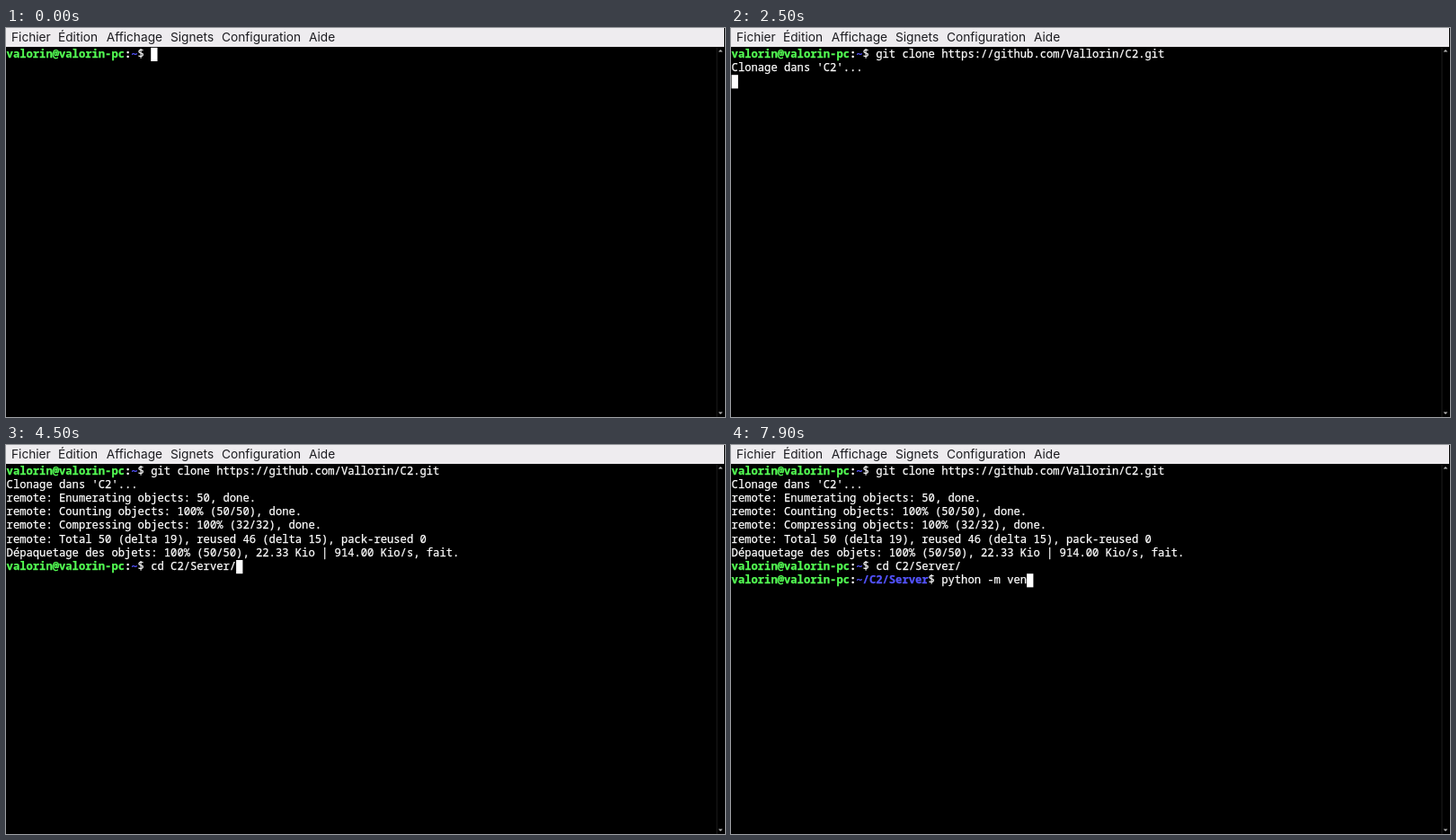
An HTML page with a canvas that plays this animation: 800 by 433 pixels, repeating every 8 s.

```html
<!DOCTYPE html>
<html lang="fr">
<head>
<meta charset="utf-8">
<title>Terminal</title>
<style>
  html, body { margin: 0; width: 100%; height: 100%; overflow: hidden; background: #000; }
  canvas { display: block; }
</style>
</head>
<body>
<canvas id="stage" width="800" height="433"></canvas>
<script>
const ctx = document.getElementById('stage').getContext('2d');
const LOOP = 8000;
const CELL = 7.3, ROW = 15.17, LEFT = 0.6, TOP = 21.85, BASE = 10.95;
const MONO = '"Noto Sans Mono", "DejaVu Sans Mono", monospace';
const SIZE = CELL / 0.6;
const WHITE = '#fff', GREEN = '#54ff54', BLUE = '#5454ff';
const USER = 'valorin@valorin-pc';

const MENU = [['Fichier', 6], ['Édition', 58], ['Affichage', 111.7],
  ['Signets', 183], ['Configuration', 240], ['Aide', 337]];

const CLONE = 'git clone ';
const URL_TEXT = 'https://github.com/Vallorin/C2.git';

// Each command: [time, typed text] steps
const cloneSteps = [
  [100, 'g'], [200, 'gi'], [300, 'git'], [400, 'git '], [600, 'git c'],
  [700, 'git cl'], [800, 'git clo'], [900, 'git clon'], [1000, 'git clone'],
  [1100, CLONE], [1400, CLONE + URL_TEXT]
];
const cdSteps = [
  [3700, 'c'], [3800, 'cd '], [3900, 'cd C2'], [4000, 'cd C2/'],
  [4100, 'cd C2/S'], [4400, 'cd C2/Server/']
];
const pythonSteps = [
  [6000, 'pyt'], [6100, 'python'], [6700, 'python '], [6900, 'python -'],
  [7000, 'python -m'], [7500, 'python -m '], [7800, 'python -m ve'],
  [7900, 'python -m ven']
];

// Lines appear at their time; prompts also carry typing steps
const lines = [
  { at: 0, path: '~', steps: cloneSteps },
  { at: 2500, text: "Clonage dans 'C2'..." },
  { at: 2800, text: 'remote: Enumerating objects: 50, done.' },
  { at: 2800, text: 'remote: Counting objects: 100% (50/50), done.' },
  { at: 2800, text: 'remote: Compressing objects: 100% (32/32), done.' },
  { at: 2800, text: 'remote: Total 50 (delta 19), reused 46 (delta 15), pack-reused 0' },
  { at: 2900, text: 'Dépaquetage des objets: 100% (50/50), 22.33 Kio | 914.00 Kio/s, fait.' },
  { at: 2900, path: '~', steps: cdSteps },
  { at: 4900, path: '~/C2/Server', steps: pythonSteps }
];

function typed(steps, t) {
  let text = '';
  for (const [at, value] of steps) if (t >= at) text = value;
  return text;
}

// Writes on the character grid and returns the next column
function write(text, col, row, color = WHITE, weight = 400) {
  ctx.font = `${weight} ${SIZE}px ${MONO}`;
  ctx.fillStyle = ctx.strokeStyle = color;
  ctx.lineWidth = 0.25;
  const y = TOP + row * ROW + BASE;
  for (const ch of text) {
    const x = LEFT + col * CELL;
    ctx.fillText(ch, x, y);
    // A hairline outline gives the medium weight
    ctx.strokeText(ch, x, y);
    col++;
  }
  return col;
}

function drawCursor(col, row) {
  ctx.fillStyle = WHITE;
  ctx.fillRect(LEFT + col * CELL, TOP + row * ROW, CELL, ROW);
}

function drawTerminal(t) {
  let col = 0, row = 0;
  lines.forEach((line, i) => {
    if (t < line.at) return;
    if (line.steps) {
      col = write(USER, 0, i, GREEN, 700);
      col = write(':', col, i, WHITE, 700);
      col = write(line.path, col, i, BLUE, 700);
      col = write('$ ', col, i);
      col = write(typed(line.steps, t), col, i);
      row = i;
    } else {
      write(line.text, 0, i);
      col = 0;
      row = i + 1;
    }
  });
  drawCursor(col, row);
}

function drawArrow(y, dir) {
  ctx.fillStyle = '#b8b8b8';
  ctx.beginPath();
  ctx.moveTo(792.6, y + dir * 1.3);
  ctx.lineTo(797.4, y + dir * 1.3);
  ctx.lineTo(795, y - dir * 1.3);
  ctx.fill();
}

function drawWindow() {
  ctx.fillStyle = '#000';
  ctx.fillRect(0, 0, 800, 433);
  ctx.fillStyle = '#eeecef';
  ctx.fillRect(0, 0, 799, 21);
  ctx.fillStyle = '#1c1c20';
  ctx.font = '400 13.7px Inter, sans-serif';
  for (const [label, x] of MENU) ctx.fillText(label, x, 15.3);
  ctx.fillStyle = '#1c1c1c';
  ctx.fillRect(790.5, 21, 1, 412);
  drawArrow(25.3, 1);
  drawArrow(428.8, -1);
}

const start = performance.now();
function frame() {
  drawWindow();
  drawTerminal((performance.now() - start) % LOOP);
  requestAnimationFrame(frame);
}
frame();
</script>
</body>
</html>
```
